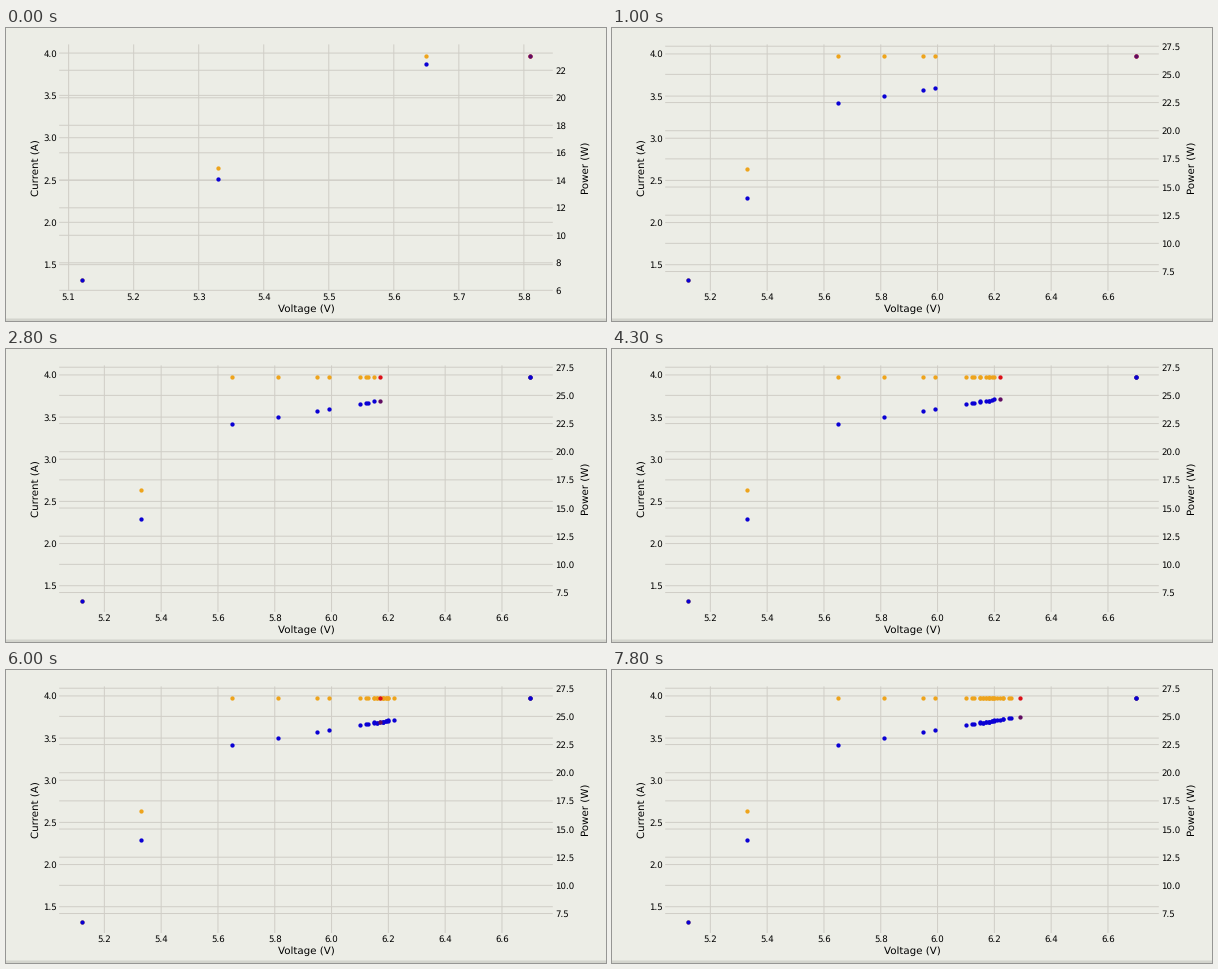
These frames come from a looping animation (600x293 px, 7900 ms). A matplotlib script:

```python
import numpy as np
import matplotlib.pyplot as plt
from matplotlib.animation import FuncAnimation
from matplotlib.patches import Rectangle

W, H, DPI = 600, 293, 100
PX = 72 / DPI  # points per pixel
FRAMES, STEP_MS = 79, 100
LEFT, RIGHT, TOP, BOTTOM = 53.2, 546.8, 16.4, 263.1

BG, GRID = "#ecede6", "#d0cec7"
ORANGE, BLUE, RED, PURPLE = "#eea41c", "#0a00d4", "#dc1018", "#600c62"

volts = np.array([
    5.12, 5.33, 5.65, 5.81, 5.95, 5.99, 6.70, 6.70, 6.12, 6.10,
    6.13, 6.15, 6.17, 6.18, 6.15, 6.20, 6.18, 6.19, 6.22,
    6.16, 6.19, 6.20, 6.18, 6.16, 6.17,
    6.21, 6.23, 6.25, 6.23, 6.26, 6.29])
amps = np.full(len(volts), 3.97)
amps[:2] = 1.32, 2.64
amps[[6, 8, 11, 15]] = 3.98
watts = volts * amps

plt.rcParams.update({
    "font.family": "DejaVu Sans", "axes.axisbelow": True,
    "path.snap": False, "lines.solid_capstyle": "butt",
    "text.hinting": "none"})
fig = plt.figure(figsize=(W / DPI, H / DPI), dpi=DPI, facecolor=BG)
ax = fig.add_axes([LEFT / W, 1 - BOTTOM / H,
                   (RIGHT - LEFT) / W, (BOTTOM - TOP) / H], facecolor=BG)
twin = ax.twinx()


def style(a):
    a.tick_params(length=0, pad=2.3 * PX, labelsize=8.7 * PX)
    a.tick_params(axis="x", pad=1.9 * PX)
    a.grid(True, color=GRID, lw=1 * PX)
    for spine in a.spines.values():
        spine.set_visible(False)


def dots(a, color):
    return a.plot([], [], "o", color=color, ms=4.3 * PX, mew=0)[0]


def label(x, y, text, rotation=0):
    fig.text(x / W, 1 - y / H, text, size=10.2 * PX, rotation=rotation,
             ha="center", va="center")


def padded(values):
    low, high = values.min(), values.max()
    pad = 0.05 * (high - low)
    return low - pad, high + pad


style(ax)
style(twin)
twin.xaxis.grid(False)
label(300, 281, "Voltage (V)")
label(29.8, 140, "Current (A)", 90)
label(579.6, 139.5, "Power (W)", 90)
fig.add_artist(Rectangle((0, 0), 1, 2.5 / H, transform=fig.transFigure,
                         color="#d3d4cd", lw=0))

current, current_now = dots(ax, ORANGE), dots(ax, RED)
power, power_now = dots(twin, BLUE), dots(twin, PURPLE)


def update(i):
    n = 4 + i * 6 // 17  # readings taken so far
    v, a, p = volts[:n], amps[:n], watts[:n]
    current.set_data(v[:-1], a[:-1])
    power.set_data(v[:-1], p[:-1])
    current_now.set_data(v[-1:], a[-1:])
    power_now.set_data(v[-1:], p[-1:])
    ax.set_xlim(padded(v))
    ax.set_ylim(padded(a))
    twin.set_ylim(padded(p))
    return current, current_now, power, power_now


anim = FuncAnimation(fig, update, frames=FRAMES, interval=STEP_MS,
                     repeat=True, repeat_delay=0, blit=False)
plt.show()
```
